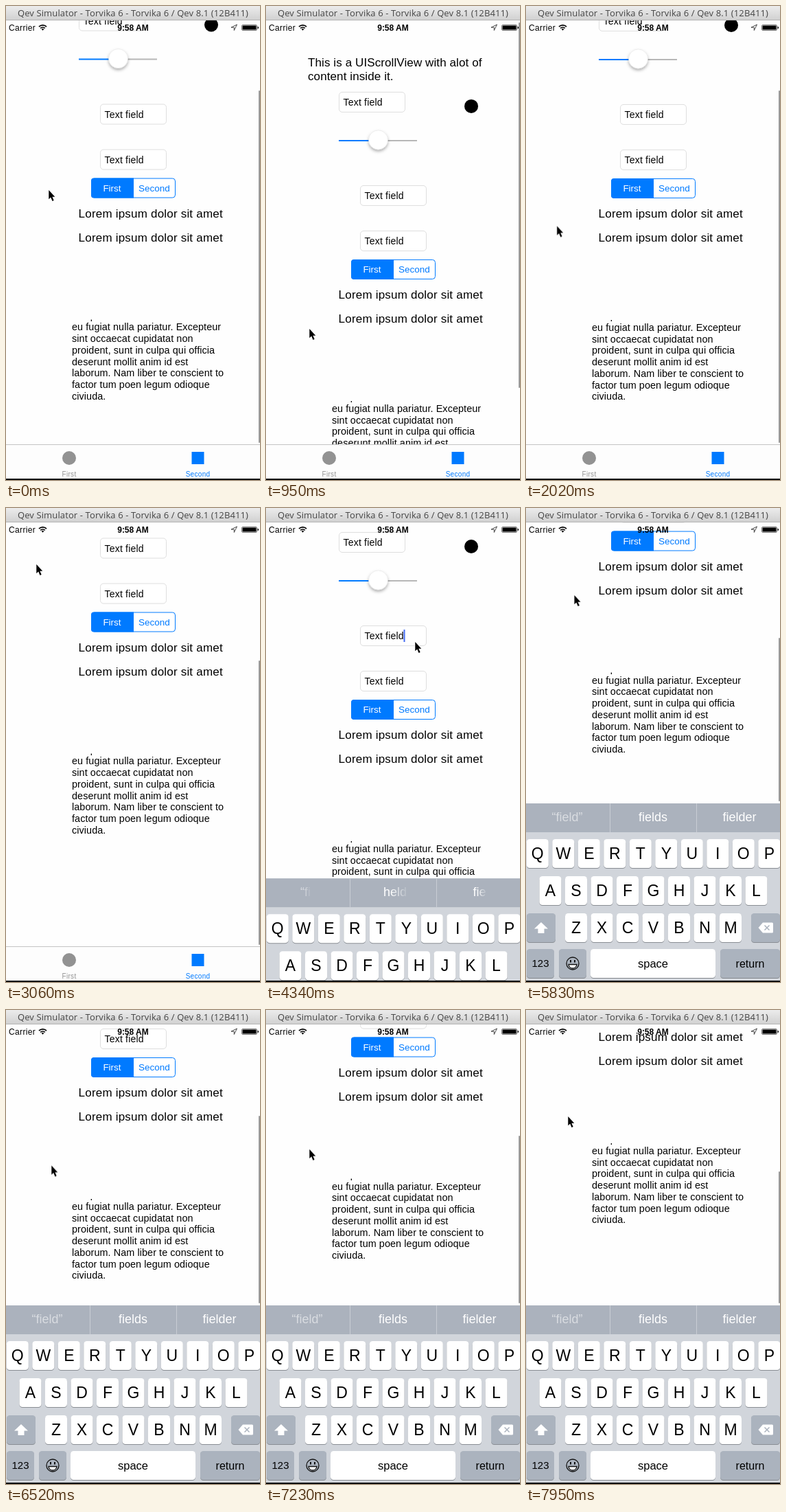
An HTML page for the animation above (8 s loop, 370 px wide and 690 px high).

```html
<!DOCTYPE html>
<html lang="en">
<head>
<meta charset="utf-8">
<title>Scroll view with keyboard</title>
<style>
@property --y { syntax: "<length>"; inherits: true; initial-value: 0px; }
@property --max { syntax: "<length>"; inherits: true; initial-value: 81px; }
@property --len { syntax: "<length>"; inherits: true; initial-value: 541px; }
@property --rate { syntax: "<number>"; inherits: true; initial-value: .8765; }

html, body { margin: 0; width: 100%; height: 100%; overflow: hidden; background: #fff; }
svg { position: absolute; left: 0; display: block; }
text { white-space: pre; }
.stage {
  position: relative; width: 370px; height: 690px; overflow: hidden; background: #fefefe;
  font: 14px "Liberation Sans", Arial, sans-serif;
  animation: scroll 8s linear infinite, limits 8s step-end infinite;
}
.view { position: absolute; left: 0; top: 21px; width: 370px; height: 617px; overflow: hidden; }
.content { top: -21px; transform: translateY(calc(0px - var(--y))); }
.bar {
  position: absolute; left: 368px; width: 2px; border-radius: 1px; background: #9a9a9a;
  top: calc(24px + clamp(0px, var(--y), var(--max)) * var(--rate) + max(0px, var(--y) - var(--max)));
  height: calc(var(--len) - max(0px, 0px - var(--y)) - max(0px, var(--y) - var(--max)));
  animation: bar 8s linear infinite;
}
.keyboard { top: 430px; animation: keyboard 8s linear infinite; }
.caret { opacity: 0; animation: caret 8s linear infinite; }
.early { animation: early 8s linear infinite; }
.late { animation: late 8s linear infinite; }
.pointer { left: 0; top: 0; overflow: visible; animation: pointer 8s linear infinite; }

.head { font-size: 17px; letter-spacing: .1px; }
.label { font-size: 17px; letter-spacing: .2px; }
.field { font-size: 14px; letter-spacing: .2px; }
.para { font-size: 14.4px; letter-spacing: .08px; }
.mid { text-anchor: middle; }

@keyframes scroll {
  0% { --y: 109.5px; }
  .3% { --y: 109.5px; animation-timing-function: cubic-bezier(.2, .5, .4, 1); }
  1.9% { --y: 83px; }
  2.2%, 4.4% { --y: 81px; }
  6.1% { --y: 0px; animation-timing-function: cubic-bezier(.3, .4, .6, 1); }
  8.8%, 9.4% { --y: -60px; animation-timing-function: cubic-bezier(.3, .3, .5, .95); }
  11.875% { --y: -9px; animation-timing-function: ease-out; }
  14.9%, 18% { --y: 0px; }
  22.4% { --y: 81px; }
  27.5% { --y: 131px; }
  34.25%, 38.5% { --y: 208.5px; animation-timing-function: cubic-bezier(.25, .5, .3, 1); }
  46.4% { --y: 84px; animation-timing-function: ease-out; }
  49.5%, 63.5% { --y: 81px; }
  64.875% { --y: 129px; }
  68.5% { --y: 238px; animation-timing-function: cubic-bezier(.3, .5, .5, 1); }
  71.5% { --y: 330px; animation-timing-function: cubic-bezier(.35, .1, .4, 1); }
  81.5% { --y: 291px; }
  82.5%, 84.5% { --y: 290px; animation-timing-function: cubic-bezier(.4, .4, .6, .9); }
  88.3%, 88.8% { --y: 355px; animation-timing-function: cubic-bezier(.3, .3, .4, 1); }
  93.5%, 94.6% { --y: 290px; animation-timing-function: cubic-bezier(.3, .4, .6, .9); }
  99.3%, 100% { --y: 372px; }
}
@keyframes limits {
  0% { --max: 81px; --len: 541px; --rate: .8765; }
  53%, 100% { --max: 290px; --len: 274px; --rate: .4448; }
}
@keyframes bar {
  0%, 47% { opacity: 1; }
  50.6%, 63.5% { opacity: 0; }
  63.9%, 100% { opacity: 1; }
}
@keyframes pointer {
  0%, 4.4% { transform: translate(62px, 268px); }
  6.1% { transform: translate(62px, 349px); }
  8.8%, 17.4% { transform: translate(63px, 470px); }
  18% { transform: translate(62px, 457px); }
  22.4% { transform: translate(51px, 376px); }
  27.5% { transform: translate(40px, 277px); }
  31% { transform: translate(36px, 170px); }
  34.25%, 40% { transform: translate(44px, 82px); }
  46.4% { transform: translate(110px, 140px); animation-timing-function: ease-out; }
  50.8%, 56% { transform: translate(217px, 195px); animation-timing-function: ease-in-out; }
  63%, 63.5% { transform: translate(74px, 248px); }
  64.875% { transform: translate(73px, 199px); }
  68.5%, 69.5% { transform: translate(72px, 90px); }
  75% { transform: translate(69px, 150px); }
  81.5% { transform: translate(66px, 226px); }
  83.7%, 84.5% { transform: translate(64px, 310px); }
  88.3%, 88.8% { transform: translate(63px, 170px); animation-timing-function: ease-in-out; }
  94%, 94.6% { transform: translate(63px, 339px); }
  99.3%, 100% { transform: translate(61px, 155px); }
}
@keyframes keyboard {
  0%, 52.6% { transform: translateY(260px); animation-timing-function: ease-in; }
  54.25% { transform: translateY(110px); animation-timing-function: cubic-bezier(.2, .6, .3, 1); }
  59%, 100% { transform: none; }
}
@keyframes caret {
  0%, 53% { opacity: 0; }
  53.1%, 60% { opacity: 1; }
  61.5%, 66% { opacity: 0; }
  67%, 72% { opacity: 1; }
  73%, 100% { opacity: 0; }
}
@keyframes early {
  0%, 55.5% { opacity: 1; }
  56.5%, 100% { opacity: 0; }
}
@keyframes late {
  0%, 55.5% { opacity: 0; }
  57.5%, 100% { opacity: 1; }
}
</style>
</head>
<body>
<div class="stage">
  <div class="view">
    <svg class="content" width="370" height="740">
      <defs>
        <filter id="lift" x="-50%" y="-50%" width="200%" height="200%">
          <feDropShadow dx="0" dy="2.5" stdDeviation="2" flood-opacity=".32"/>
        </filter>
      </defs>
      <g class="head">
        <text x="61" y="79">This is a UIScrollView with alot of</text>
        <text x="61" y="99">content inside it.</text>
      </g>
      <g id="fields" class="field"></g>
      <rect class="caret" x="200.5" y="258" width="2" height="18" fill="#426bf2"/>
      <circle cx="299" cy="137" r="10"/>
      <path d="M106 187H164" stroke="#007aff" stroke-width="2"/>
      <path d="M164 187H220" stroke="#b7b7b7" stroke-width="2"/>
      <circle cx="163.5" cy="186" r="14" fill="#fff" stroke="#ddd" stroke-width=".5" filter="url(#lift)"/>
      <rect x="124.5" y="360.5" width="122" height="28" rx="4" fill="#fff" stroke="#007aff"/>
      <path d="M186 360H128a4 4 0 0 0-4 4v21a4 4 0 0 0 4 4h58z" fill="#007aff"/>
      <g class="mid" font-size="13.5">
        <text x="154.5" y="379" fill="#fff">First</text>
        <text x="216" y="379" fill="#007aff">Second</text>
      </g>
      <g class="label">
        <text x="105.6" y="417">Lorem ipsum dolor sit amet</text>
        <text x="105.6" y="452">Lorem ipsum dolor sit amet</text>
      </g>
      <svg id="para" class="para" x="90" y="566" width="240" height="130"></svg>
    </svg>
  </div>

  <svg width="370" height="690" style="top:0">
    <defs>
      <linearGradient id="chrome" x2="0" y2="1">
        <stop stop-color="#ececec"/><stop offset="1" stop-color="#d0d0d0"/>
      </linearGradient>
    </defs>
    <rect width="370" height="21" fill="url(#chrome)"/>
    <path d="M0 20.5H370" stroke="#b4b4b4"/>
    <text class="mid" x="185" y="15" fill="#444" font-size="13" letter-spacing=".12" font-family="Open Sans, sans-serif">Qev Simulator - Torvika 6 - Torvika 6 / Qev 8.1 (12B411)</text>

    <text x="4" y="35.5" font-size="12" letter-spacing=".35">Carrier</text>
    <g fill="none" stroke="#000" stroke-width="1.7">
      <path d="M48 30.2a7.6 7.6 0 0 1 11 0"/>
      <path d="M50.2 32.4a4.6 4.6 0 0 1 6.6 0"/>
    </g>
    <path d="M51.7 33.7a2.6 2.6 0 0 1 3.6 0L53.5 35.7z"/>
    <text class="mid" x="185" y="35.5" font-size="12" font-weight="bold">9:58 AM</text>
    <path d="M336.5 27L328 31.2H332.3V35.5z" fill="none" stroke="#333" stroke-width=".9"/>
    <rect x="343.5" y="27.5" width="22" height="8" rx="1.5" fill="none" stroke="#777"/>
    <rect x="344.500" y="28.500" width="20" height="6" rx=".5"/>
    <path d="M366.6 29.7q1.500 .3 1.500 1.800t-1.500 1.800z"/>

    <rect y="638" width="370" height="50" fill="#fdfdfd"/>
    <path d="M0 638.5H370" stroke="#c4c4c4"/>
    <circle cx="92" cy="658" r="10" fill="#929292"/>
    <rect x="270.5" y="649" width="18" height="18" fill="#007aff"/>
    <g class="mid" font-size="10" letter-spacing=".3">
      <text x="92" y="685" fill="#929292">First</text>
      <text x="279.5" y="685" fill="#007aff">Second</text>
    </g>
  </svg>

  <div class="bar"></div>

  <svg class="keyboard" width="370" height="260">
    <defs>
      <linearGradient id="fade">
        <stop offset=".3" stop-color="#fff"/><stop offset="1" stop-color="#fff" stop-opacity=".15"/>
      </linearGradient>
    </defs>
    <rect width="370" height="260" fill="#d1d5db"/>
    <rect width="370" height="42" fill="#abb2bd"/>
    <path d="M122.5 0V42M248.5 0V42" stroke="#c9cdd4"/>
    <g class="early mid" font-size="18" fill="url(#fade)">
      <text x="57.5" y="26" opacity=".55">“fi</text>
      <text x="188" y="26">held</text>
      <text x="311" y="26">fie</text>
    </g>
    <g class="late mid" font-size="18" fill="#fff">
      <text x="60" y="26" opacity=".55">“field”</text>
      <text x="185" y="26">fields</text>
      <text x="311" y="26">fielder</text>
    </g>
    <g id="keys" class="mid"></g>
    <path d="M22 173l10 9.5h-5.5v6.5h-9v-6.5h-5.5z" fill="#fff"/>
    <path d="M338.5 181l6.5-7.5h13.5q1.5 0 1.5 1.5v12q0 1.5-1.5 1.5H345z" fill="#fff"/>
    <path d="M347.5 177.5l7 7m0-7l-7 7" stroke="#abb3be" stroke-width="1.5"/>
    <g fill="none" stroke="#111" stroke-width="1.3">
      <circle cx="68" cy="233" r="9"/>
      <path d="M62 234.5H74q-1 5.5-6 5.5t-6-5.5z" fill="#fff"/>
      <path d="M65 228v3.5M71 228v3.5" stroke-width="2"/>
    </g>
  </svg>

  <svg width="370" height="2" style="top:688px"><rect width="370" height="2"/></svg>

  <svg class="pointer" width="12" height="19">
    <path d="M.3 0V13.2L3.2 10.5 5.500 16 7.700 15.100 5.400 9.700H9.300z" stroke="#fff" stroke-width="1.800" paint-order="stroke"/>
  </svg>
</div>

<script>
const $ = id => document.getElementById(id);

$("fields").innerHTML = [[106, 116], [137, 252], [137, 318]].map(([x, y]) =>
  `<rect x="${x + .5}" y="${y + .5}" width="96" height="29" rx="4.5" fill="#fff" stroke="#dedede"/>
   <text x="${x + 6.5}" y="${y + 20}">Text field</text>`).join("");

$("para").innerHTML = [
  "voluptate velit esse cillum dolore",
  "eu fugiat nulla pariatur. Excepteur",
  "sint occaecat cupidatat non",
  "proident, sunt in culpa qui officia",
  "deserunt mollit anim id est",
  "laborum. Nam liber te conscient to",
  "factor tum poen legum odioque",
  "civiuda."
].map((line, i) => `<text x="6" y="${i * 16.75 - .8}">${line}</text>`).join("");

function key(x, y, w, label, size = 23, fill = "#fff") {
  const base = y + 21 + size * .36;
  return `<rect x="${x}" y="${y + 1}" width="${w}" height="42" rx="4.5" fill="#898d93"/>
    <rect x="${x}" y="${y}" width="${w}" height="42" rx="4.5" fill="${fill}"/>
    <text x="${x + w / 2}" y="${base}" font-size="${size}">${label}</text>`;
}
const row = (letters, x, y) =>
  [...letters].map((c, i) => key(x + i * 37.5, y, 32, c)).join("");
const gray = "#abb3be";

$("keys").innerHTML =
  row("QWERTYUIOP", .8, 52) + row("ASDFGHJKL", 19.5, 106) + row("ZXCVBNM", 57, 160) +
  key(1, 160, 42, "", 16, gray) + key(328, 160, 42, "", 16, gray) +
  key(1, 212, 40, "123", 15, gray) + key(48, 212, 40, "", 16, gray) +
  key(94, 212, 182, "space", 16.5) + key(283, 212, 87, "return", 16, gray);
</script>
</body>
</html>
```
